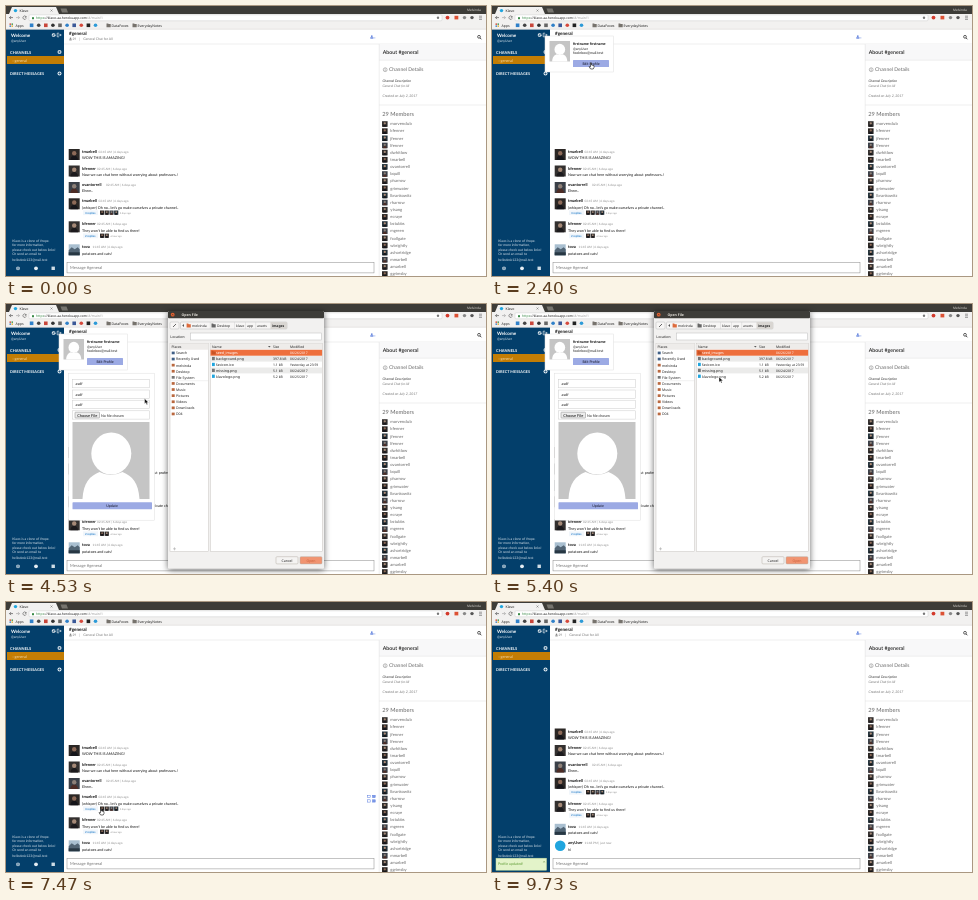
Recreate the animation shown at these times as an HTML page. Size 480 by 270 pixels, loop 9.99 s.

```html
<!DOCTYPE html>
<html lang="en">
<head>
<meta charset="utf-8">
<title>Team chat demo</title>
<style>
html, body { margin: 0; width: 100%; height: 100%; overflow: hidden; background: #fff; }
svg { display: block; width: 100%; height: 100%; font-family: Lato, sans-serif; text-rendering: geometricPrecision; }
text { white-space: pre; }
.ui { font-family: "Noto Sans", sans-serif; }
#dialog { filter: drop-shadow(0 1px 3px #0009); }
</style>
</head>
<body>
<svg id="stage" viewBox="0 0 480 270"></svg>
<script>
const LOOP = 9990, NAVY = '#033f6b', LOGO = '#20a5de', BUTTON = '#9caae4';
const APP = 'Klavo', USER = 'anyUser', OWNER = 'melvinda', LOGO_FILE = 'klavologo.png';

const text = (x, y, size, str, fill = '#222', more = '') =>
  `<text x="${x}" y="${y}" font-size="${size}" fill="${fill}" ${more}>${str}</text>`;
const rect = (x, y, w, h, fill, more = '') =>
  `<rect x="${x}" y="${y}" width="${w}" height="${h}" fill="${fill}" ${more}/>`;
const dot = (x, y, r, fill, more = '') => `<circle cx="${x}" cy="${y}" r="${r}" fill="${fill}" ${more}/>`;
const line = (d, stroke, w = .5) => `<path d="${d}" fill="none" stroke="${stroke}" stroke-width="${w}"/>`;
const group = (id, body) => `<g id="${id}">${body}</g>`;
const edge = c => `stroke="${c}" stroke-width=".5"`;
const BOLD = 'font-weight="700"', MID = 'text-anchor="middle"', ITALIC = 'font-style="italic"';

// Plain figure on a dark ground
const TONES = [['#2b2725', '#8d6a58', '#15151a'], ['#33302f', '#a58977', '#1c1a1d'],
  ['#3b4048', '#8d8078', '#4d2c25'], ['#26343c', '#b08d78', '#16181c']];
function avatar(x, y, s, tone) {
  const [bg, skin, coat] = TONES[tone % 4];
  return rect(x, y, s, s, bg) +
    `<path d="M${x + s * .15} ${y + s}q${s * .05} ${-s * .42} ${s * .35} ${-s * .42}t${s * .35} ${s * .42}z" fill="${coat}"/>` +
    dot(x + s * .5, y + s * .38, s * .2, skin);
}
const landscape = (x, y, s) => rect(x, y, s, s, '#a9bfd0') +
  `<path d="M${x} ${y + 6}l3-3 3 2 3-2 2 2v6h-11z" fill="#526575"/>` + rect(x, y + 8, s, s - 8, '#273743');
const blank = (x, y, s) => rect(x, y, s, s, '#c5c5c5') +
  `<g transform="translate(${x} ${y}) scale(${s / 77})" fill="#fff"><ellipse cx="38.8" cy="31.5" rx="20" ry="21"/>` +
  `<path d="M10 77C11 61 17 54 27 50Q38 56 50 50C60 54 66 61 67 77Z"/></g>`;
const plus = (x, y) => dot(x, y, 2, '#dfe8ef') + line(`M${x - 1.2} ${y}h2.4M${x} ${y - 1.2}v2.4`, NAVY, .6);
const folder = (x, y, c = '#77736d') => `<path d="M${x} ${y}h1.6l.6.7h2v3.1h-4.2z" fill="${c}"/>`;

function browser() {
  const marks = ['#2f80c9', '#444', '#c8463a', '#333', '#666', '#2f80c9', '#3b5998', '#d6493c', '#222', '#2d9bd8'];
  const apps = ['#d9523f', '#4a9b55', '#4285c8', '#e3b23c'];
  return `<g class="ui">` + rect(0, 0, 480, 8, '#3d3c38') +
    `<path d="M3 8L6 1H50L53 8Z" fill="#f2f1f0"/><path d="M54.5 2.5h6l1.5 4h-6z" fill="#76746e"/>` +
    dot(9.5, 4.6, 1.7, LOGO) + text(13.5, 6, 3.5, APP) + line('M44.5 3.5l2 2m0-2l-2 2', '#666') +
    text(461, 4.8, 3.2, OWNER[0].toUpperCase() + OWNER.slice(1), '#d8d5cf') +
    rect(0, 8, 480, 15.3, '#f2f1f0') +
    line('M7 11.6H3.5l1.5-1.5m-1.5 1.5l1.5 1.5', '#555', .7) + line('M10 11.6h3.5l-1.5-1.5m1.5 1.5l-1.5 1.5', '#aaa', .7) +
    line('M20 10.7a1.7 1.7 0 1 0 .2 1.6m0-2.2v1.2h-1.3', '#555', .6) +
    rect(23, 8.8, 413, 6, '#fff', `rx="1" ${edge('#ccc')}`) + rect(26, 11.2, 2, 2, '#3a8a48') +
    text(30, 13.1, 3.4, `<tspan fill="#3a8a48">https</tspan>://${APP.toLowerCase()}-aa.herokuapp.com<tspan fill="#999">/#/main/1</tspan>`) +
    dot(432, 11.8, 1.2, '#777') + dot(441.5, 11.6, 1.9, '#d33a2c') + rect(448.5, 9.8, 3.8, 3.6, '#dc5134') +
    dot(458.5, 11.6, 1.7, '#888') + dot(466, 11.6, 1.7, '#555') + line('M473 10.2h3m-3 1.6h3m-3 1.6h3', '#666', .6) +
    apps.map((c, i) => rect(3.5 + i % 2 * 2, 17.4 + (i >> 1) * 2, 1.5, 1.5, c)).join('') + text(9.5, 20.7, 3.5, 'Apps') +
    marks.map((c, i) => i % 2 ? dot(25.6 + i * 7.1, 19.3, 1.8, c) : rect(23.8 + i * 7.1, 17.5, 3.6, 3.6, c)).join('') +
    folder(100.5, 17.4) + text(105.5, 20.7, 3.5, 'DataFoxes') + folder(126.5, 17.4) + text(131.5, 20.7, 3.5, 'EverydayNotes') +
    line('M0 23.2H480', '#c9c7c3', .4) + '</g>';
}

function sidebar() {
  const about = [`${APP} is a clone of Vrope.`, 'for more information,', 'please check out below links!', 'Or send an email to'];
  return rect(0, 23.3, 58, 246.7, NAVY) +
    text(5, 31, 4.6, 'Welcome', '#fff', BOLD) + text(5, 35.6, 3.4, '@' + USER, '#dde7ee') +
    dot(47.7, 29, 1.3, 'none', 'stroke="#fff" stroke-width="1.3" stroke-dasharray=".8 .25"') +
    line('M53 27.2h-1.8v3.6h1.8M52.2 29h3m-1.2-1.2l1.2 1.2-1.2 1.2', '#fff', .6) +
    text(4, 47.5, 4, 'CHANNELS', '#fff', BOLD) + plus(53.5, 46) +
    rect(1, 50, 57, 8, '#c37d04') + text(6.5, 55.5, 3.8, '› general', '#f5dfb4') +
    text(4, 69, 3.85, 'DIRECT MESSAGES', '#fff', BOLD) + plus(53.5, 67.5) +
    about.map((s, i) => text(6.2, 235.5 + i * 4.6, 3.4, s, '#d6e1e9')).join('') +
    text(6.2, 255.2, 3.4, 'hellodesk123@mail.test', '#d6e1e9') +
    dot(12, 262.3, 1.9, '#cfdde6') + line('M10.2 262.3h3.6M12 260.4q-1.6 1.9 0 3.8q1.6-1.9 0-3.8', NAVY, .3) +
    dot(30, 262.3, 1.9, '#e6eef3') + rect(45.5, 260.6, 3.4, 3.4, '#cfdde6');
}

function header() {
  return text(63, 28.8, 4.6, '#general', '#111', BOLD) +
    dot(64.5, 32.4, .8, '#888') + rect(63.3, 33.3, 2.4, 1.1, '#888') + text(66.5, 34.4, 3.2, '29', '#777') +
    line('M73.5 31.5v3.4', '#bbb', .4) + text(77.3, 34.4, 3.4, 'General Chat for All', '#777') +
    dot(365.8, 30.2, .9, '#6c8be0') + rect(364.3, 31.2, 3, 1.5, '#6c8be0') + line('M367.4 31.9h2', '#6c8be0') +
    dot(473, 30.8, 1.4, 'none', 'stroke="#222" stroke-width=".7"') + line('M474 31.9l1.4 1.4', '#222', .8) +
    line('M58 38H480', '#ddd');
}

function panel() {
  const names = 'morvenclub kfenner jfenner lfenner dwhitlow tmarbell ovantorrell bquill pharrow grimwater lbrankowitz rharrow ytsang ecraye bstubbs mgreen fcollgate wbrightly ashortridge mmarbell amarbell ggrimsby';
  return rect(373, 38, 107, 232, '#fff') + rect(373, 38, 107, 16, '#f8f8f9') +
    line('M373.2 38V270M373 54.2H480M373 99H480', '#ddd') + text(376.8, 47.8, 5.25, 'About #general', '#111', 'font-weight="500"') +
    dot(379.2, 63.7, 1.9, 'none', edge('#777')) + line('M379.2 63.3v1.5m0-2.4v.4', '#777', .6) +
    text(383, 65.4, 5, 'Channel Details', '#666') +
    text(376.5, 76, 3.4, 'Channel Description', '#333', ITALIC) + text(376.5, 81.2, 3.3, 'General Chat for All', '#777', ITALIC) +
    text(376.5, 90.7, 3.5, 'Created on July 2, 2017', '#777', ITALIC) + text(376.3, 109.6, 5.7, '29 Members', '#666') +
    names.split(' ').map((n, i) => avatar(376, 115.2 + i * 7.143, 5.6, i * 3 + 1) + text(384.3, 119.3 + i * 7.143, 4.15, n, '#666')).join('');
}

function message(y, name, time, x, body, pic) {
  return pic + text(76, y + 4.1, 4, name, '#111', BOLD) + text(x, y + 4.1, 3.05, time, '#888') + text(76, y + 10.4, 3.72, body, '#111');
}
function replies(y, n, ago) {
  let out = rect(77, y - 2.4, 15, 4.8, '#f1f6fb') + text(79, y + 1, 2.8, n + ' replies', '#2d83cc', BOLD);
  for (let i = 0; i < n; i++) out += avatar(94 + i * 4.7, y - 2.2, 4.2, i);
  return out + text(95 + n * 4.7, y + .8, 2.4, ago, '#888');
}
function chat() {
  const old = '02:45 AM | 6 days ago', [r, h, a] = ['tmarbell', 'kfenner', 'ovantorrell'];
  return message(143, r, old, 92.5, 'WOW THIS IS AMAZING!', avatar(62.7, 143, 11, 0)) +
    message(159.5, h, old, 91, "Now we can chat here without worrying about professors..!", avatar(62.7, 159.5, 11, 1)) +
    message(176, a, old, 100, 'Ehem..', avatar(62.7, 176, 11, 2)) +
    message(192.3, r, old, 92.5, "(whisper) Oh no.. let's go make ourselves a private channel..", avatar(62.7, 192.3, 11, 0)) +
    replies(206.7, 4, '5 days ago') +
    message(215.3, h, old, 91, "They won't be able to find us there!", avatar(62.7, 215.3, 11, 1)) +
    replies(229.8, 2, '6 hour ago') +
    message(238.3, 'tova', '11:45 AM | 6 days ago', 86.5, 'potatoes and cats!', landscape(62.7, 238.3, 11)) +
    group('sent', message(254.8, USER, '11:48 PM | just now', 92.5, 'hi', dot(68.2, 260.3, 5.3, LOGO)));
}

const hoverIcons = () => [0, 1, 2, 3].map(i =>
  rect(361.6 + i % 2 * 5, 193.3 + (i >> 1) * 4.5, 2.6, 2.3, i % 2 ? '#7d99e6' : 'none', edge('#5a7de0'))).join('');

const profile = () => rect(53, 30, 68.5, 36, '#fff', edge('#ddd')) + blank(57.5, 35, 20.5) +
  text(81, 39.4, 3.75, 'firstname firstname', '#111', BOLD) + text(81, 43.6, 3.4, '@' + USER) +
  text(81, 47.8, 3.6, 'fooInbox@mail.test') +
  rect(81, 54, 36, 7, BUTTON, 'rx=".6"') + text(99, 58.8, 3.6, 'Edit Profile', '#112', MID);

const form = () => rect(62.7, 69.2, 86, 147, '#fff', edge('#ddd')) +
  [75.5, 86, 96.2, 106.8].map((y, i) => rect(66.5, y, 77, 8.3, '#fff', edge('#ccc')) +
    (i < 3 ? `<text id="field${i}" x="69.5" y="${y + 5.5}" font-size="3.8" fill="#222"></text>` : '')).join('') +
  rect(69, 108.2, 24.5, 5.8, '#ececec', `rx=".6" ${edge('#888')}`) + text(81.2, 112.5, 3.9, 'Choose File', '#000', MID) +
  group('before', text(95, 112.5, 3.65, 'No file chosen') + blank(66.5, 118, 77)) +
  group('after', text(95, 112.5, 3.65, LOGO_FILE) + dot(105.3, 156.3, 33.5, LOGO)) +
  rect(66.5, 198.3, 79.5, 7, BUTTON, 'rx=".6"') + text(106, 203, 3.6, 'Update', '#112', MID);

function dialog() {
  const crumbs = [[182, OWNER], [207, 'Desktop'], [230, APP.toLowerCase()], [241, 'app'], [251, 'assets'], [266, 'images']];
  const places = ['Search', 'Recently Used', OWNER, 'Desktop', 'File System', 'Documents', 'Music', 'Pictures', 'Videos', 'Downloads', 'D04'];
  const files = [['seed_images', '', '06/26/2017'], ['background.png', '397.8 kB', '06/24/2017'], ['favicon.ico', '1.1 kB', 'Yesterday at 23:59'],
    ['missing.png', '5.1 kB', '06/24/2017'], [LOGO_FILE, '5.2 kB', '06/25/2017']];
  const button = (x, s, bg, fg) => rect(x, 252.7, 22, 7.2, bg, `rx="1" ${edge('#b5aea7')}`) + text(x + 11, 257.7, 3.5, s, fg, MID);
  return `<g class="ui">` + rect(162, 7, 156, 257.7, '#f2f1f0', 'rx="1"') +
    rect(162, 7, 156, 7.3, '#3d3c38', 'rx="1"') + dot(166.7, 10.7, 1.9, '#e4602f') + line('M166 10l1.4 1.4m0-1.4L166 11.4', '#3d3c38') +
    text(175.5, 12.1, 3.5, 'Open File', '#e5e1da', BOLD) +
    rect(164, 18, 9, 7, '#f7f6f5', `rx="1" ${edge('#bbb')}`) + line('M167 23l3-3', '#555', .9) +
    rect(174.5, 18, 106.5, 7, '#f7f6f5', `rx="1" ${edge('#bbb')}`) + rect(264.5, 18, 16.5, 7, '#d9d6d2') +
    `<path d="M178 20v3l-1.8-1.5z" fill="#555"/>` + folder(180.6, 19.6, '#dd6b3c') + folder(205.5, 19.6, '#666') +
    crumbs.map(([x, s], i) => text(x + (i < 2 ? 4 : 0), 22.8, 3.4, s, '#222', i == 5 ? BOLD : '')).join('') +
    line('M204.3 18v7M228.5 18v7M239.5 18v7M249.7 18v7', '#ccc', .4) +
    text(164.3, 33.8, 3.5, 'Location:') + rect(184.5, 29, 131, 7, '#fff', edge('#bbb')) +
    rect(164, 39.5, 38.5, 208, '#fff', edge('#c8c4c0')) + rect(204.3, 39.5, 112, 208, '#fff', edge('#c8c4c0')) +
    rect(164.2, 39.7, 38.1, 6, '#eeecea') + rect(204.5, 39.7, 111.6, 6, '#eeecea') +
    text(165.5, 43.9, 3.4, 'Places') + text(206, 43.9, 3.4, 'Name') + `<path d="M262 42h2.6l-1.3 1.6z" fill="#555"/>` +
    text(267, 43.9, 3.4, 'Size') + text(284, 43.9, 3.4, 'Modified') +
    places.map((s, i) => rect(165.7, 47.6 + i * 6.1, 3, 2.7, i < 2 ? '#3f5f86' : i == 4 ? '#777' : '#b9683f') +
      text(170, 50.3 + i * 6.1, 3.5, s)).join('') +
    line('M164 76.7h38.5', '#ddd', .4) +
    [1, 3].map(i => rect(204.5, 45.8 + i * 5.9, 111.6, 5.9, '#ebebea')).join('') +
    rect(204.5, 45.8, 111.6, 5.9, '#ee6f3d', 'id="pick"') +
    files.map((f, i) => (i ? rect(206, 47 + i * 5.9, 2.8, 3.3, i % 2 ? '#777' : LOGO) : folder(205.5, 46.7, '#c95325')) +
      f.map((s, j) => text([210, 267, 284][j], 50 + i * 5.9, [3.6, 3.4, 3.3][j], s, '#222', `class="file${i}"`)).join('')).join('') +
    line('M167 244.8h3m-1.5-1.5v3', '#aaa', .6) + button(270, 'Cancel', '#f4f3f2', '#222') + button(294, 'Open', '#f19471', '#c9603c') + '</g>';
}

const stage = document.getElementById('stage');
stage.innerHTML = rect(0, 0, 480, 270, '#fff') + group('list', chat()) + rect(58, 255, 315, 15, '#fff') +
  rect(61, 256.7, 307, 10.2, '#fff', edge('#888')) + '<text id="entry" x="64" y="263.2" font-size="4.1"></text>' +
  group('hover', hoverIcons()) + header() + panel() + sidebar() + browser() +
  group('profile', profile()) + group('form', form()) + group('dialog', dialog()) +
  group('toast', rect(4, 256.2, 50.5, 12, '#e3f3c9', edge('#c5dfa0')) + text(6, 263.2, 3.6, 'Profile updated!', '#5d9a33') +
    line('M51.3 259l1.6 1.6m0-1.6l-1.6 1.6', '#7a9b5c')) +
  group('cursor', `<path id="arrow" d="M0 0V5.2L1.3 4.1 2.2 6.1 3.1 5.7 2.3 3.8H4Z" fill="#111" stroke="#fff" stroke-width=".4"/>` +
    `<path id="hand" d="M-.5 0Q0-.5.5 0V2L3 2.6V4.5L2.2 6H-.4L-2 3.6-.5 3.8Z" fill="#fff" stroke="#111" stroke-width=".6"/>`);

const el = Object.fromEntries([...stage.querySelectorAll('[id]')].map(n => [n.id, n]));
const show = (id, on) => el[id].style.display = on ? '' : 'none';

// Pointer stops: time, x, y
const stops = [[0, 486, 100], [350, 486, 100], [1050, 60, 45], [1270, 38, 30], [1450, 39, 30], [1700, 47.5, 29], [2000, 48, 29],
  [2350, 99, 57], [2600, 99, 57], [2930, 90, 80], [3700, 90, 80], [3950, 91.5, 111], [4300, 91.5, 111], [4850, 215, 68],
  [5350, 227, 73], [5930, 227, 72], [6100, 227, 72], [6800, 106, 201], [7070, 106, 201], [7400, 95, 207], [7520, 95, 207],
  [7900, 78, 261], [9200, 78, 261], [9700, 486, 150], [LOOP, 486, 150]];
const clickable = [[1150, 2050], [2280, 2650], [3850, 4300], [6700, 7100], [7350, 7550]];

function draw(t) {
  const within = (a, b) => t >= a && t < b;
  show('profile', within(1800, 7070));
  show('form', within(2450, 7070));
  show('dialog', within(4330, 5870));
  show('before', t < 5870);
  show('after', t >= 5870);
  show('hover', within(7130, 7600));
  show('sent', t >= 8330);
  show('toast', t >= 7730);
  el.list.setAttribute('transform', `translate(0 ${t < 8330 ? 0 : -16.5})`);

  const typed = Math.max(0, Math.floor((t - 3070) / 60) + 1);
  for (let i = 0; i < 3; i++) el['field' + i].textContent = 'asdf'.slice(0, Math.max(0, typed - i * 4));

  const entry = within(8070, 8330) ? (t < 8130 ? 'h' : 'hi') : 'Message #general';
  el.entry.textContent = entry;
  el.entry.setAttribute('fill', entry.length < 3 ? '#222' : '#777');

  const chosen = t < 5700 ? 0 : 4;
  el.pick.setAttribute('y', 45.8 + chosen * 5.9);
  for (const i of [0, 4]) stage.querySelectorAll('.file' + i).forEach(n => n.setAttribute('fill', i == chosen ? '#fff' : '#222'));

  const k = stops.findIndex(s => s[0] > t), [t0, x0, y0] = stops[k - 1], [t1, x1, y1] = stops[k];
  const p = (t - t0) / (t1 - t0), e = p * p * (3 - 2 * p);
  el.cursor.setAttribute('transform', `translate(${x0 + (x1 - x0) * e} ${y0 + (y1 - y0) * e})`);
  const hand = clickable.some(([a, b]) => within(a, b));
  show('hand', hand);
  show('arrow', !hand);
}

const start = performance.now();
function tick() {
  draw((performance.now() - start) % LOOP);
  requestAnimationFrame(tick);
}
tick();
</script>
</body>
</html>
```
